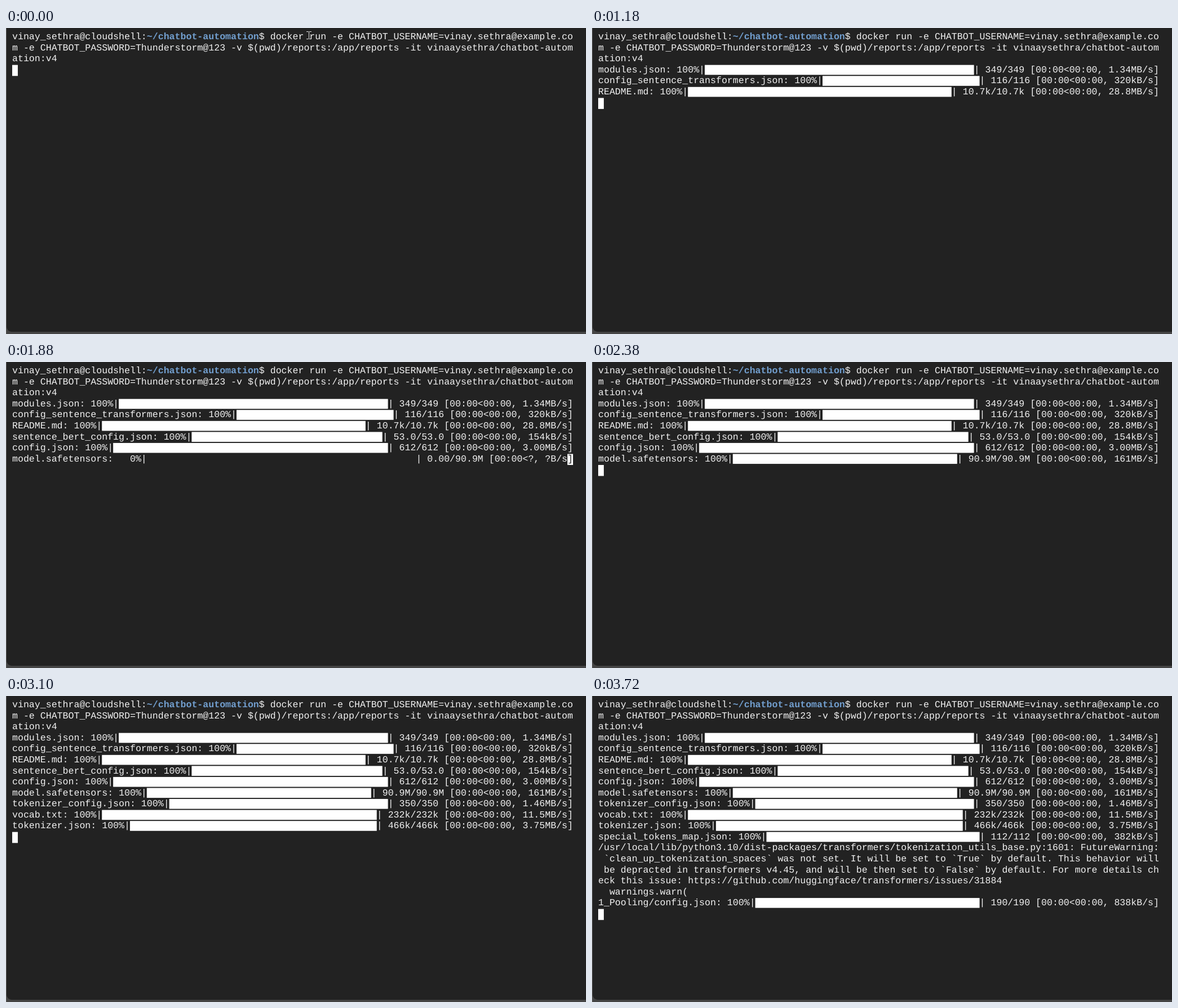
These frames come from a looping animation (1029 by 544 pixels, 8 s). An HTML page with a canvas:

```html
<!DOCTYPE html>
<html lang="en">
<head>
<meta charset="utf-8">
<title>Terminal</title>
<style>
  html, body { margin: 0; width: 100%; height: 100%; overflow: hidden; background: #222; }
  canvas { display: block; }
</style>
</head>
<body>
<canvas id="stage" width="1029" height="544"></canvas>
<script>
const ctx = document.getElementById('stage').getContext('2d');
const LOOP = 8000, COLS = 100;
const X0 = 11, Y0 = 7, CELL = 9.95, ROW = 19.56, BASE = 13.2, BAR = 17.6;
const FONT = '16.58px "Liberation Mono", "Courier New", monospace';
const BG = '#222222', FG = '#ffffff', INK = '#f2f2f2', BLUE = '#729fcf';

const USER = 'vinay_sethra@cloudshell:';
const PATH = '~/chatbot-automation';
const COMMAND = [
  USER + PATH + '$ docker run -e CHATBOT_USERNAME=vinay.sethra@example.co',
  'm -e CHATBOT_PASSWORD=Thunderstorm@123 -v $(pwd)/reports:/app/reports -it vinaaysethra/chatbot-autom',
  'ation:v4'
];
const WARNING = [
  '/usr/local/lib/python3.10/dist-packages/transformers/tokenization_utils_base.py:1601: FutureWarning:',
  ' `clean_up_tokenization_spaces` was not set. It will be set to `True` by default. This behavior will',
  ' be depracted in transformers v4.45, and will be then set to `False` by default. For more details ch',
  'eck this issue: https://github.com/huggingface/transformers/issues/31884',
  '  warnings.warn('
];

// A progress line; the bar fills whatever the text leaves of the row.
function progress(name, done, total, rate, part = 1, left = '00:00') {
  const pct = String(Math.floor(part * 100)).padStart(3);
  return {
    head: `${name}: ${pct}%|`,
    tail: `| ${done}/${total} [00:00<${left}, ${rate}B/s]`,
    part
  };
}
const full = (name, size, rate) => progress(name, size, size, rate);
const model = (done, rate, part, left) =>
  progress('model.safetensors', done, '90.9M', rate, part, left);

// Each event prints lines, rewrites the open line, or moves the pointer.
const events = [
  { at: 0, print: COMMAND, mouse: [537, 13] },
  { at: 500, mouse: [541, 8] },
  { at: 650, mouse: [640, 120] },
  { at: 770, print: [full('modules.json', '349', '1.34M')], mouse: [730, 231] },
  { at: 900, mouse: [745, 300] },
  { at: 1030, print: [full('config_sentence_transformers.json', '116', '320k')], mouse: null },
  { at: 1180, print: [full('README.md', '10.7k', '28.8M')] },
  { at: 1460, print: [full('sentence_bert_config.json', '53.0', '154k')] },
  { at: 1590, print: [full('config.json', '612', '3.00M')] },
  { at: 1880, open: model('0.00', '?', 0, '?') },
  { at: 2010, open: model('21.0M', '152M', 0.231) },
  { at: 2130, open: model('41.9M', '158M', 0.461) },
  { at: 2260, open: model('73.4M', '160M', 0.807) },
  { at: 2380, print: [full('model.safetensors', '90.9M', '161M')] },
  { at: 2660, print: [full('tokenizer_config.json', '350', '1.46M')] },
  { at: 2820, print: [full('vocab.txt', '232k', '11.5M')] },
  { at: 3100, print: [full('tokenizer.json', '466k', '3.75M')] },
  { at: 3350, print: [full('special_tokens_map.json', '112', '382k')] },
  { at: 3470, print: WARNING },
  { at: 3720, print: [full('1_Pooling/config.json', '190', '838k')] }
];

const colX = col => X0 + col * CELL;
const rowY = row => Y0 + row * ROW;

function write(text, col, row, color = INK, weight = '') {
  ctx.font = `${weight} ${FONT}`;
  ctx.fillStyle = color;
  [...text].forEach((ch, i) => {
    if (ch !== ' ') ctx.fillText(ch, colX(col + i), rowY(row) + BASE);
  });
}

function block(col, row, cells, height) {
  ctx.fillStyle = FG;
  ctx.fillRect(colX(col), rowY(row), cells * CELL, height);
}

function writeLine(line, row) {
  if (typeof line === 'string') return write(line, 0, row);
  const { head, tail, part } = line;
  const room = COLS - head.length - tail.length;
  write(head, 0, row);
  block(head.length, row, Math.floor(room * part * 8) / 8, BAR);
  write(tail, head.length + room, row);
}

function drawPrompt() {
  write(USER, 0, 0);
  write(PATH, USER.length, 0, BLUE, 'bold');
  const col = USER.length + PATH.length;
  write(COMMAND[0].slice(col), col, 0);
}

function drawMouse([x, y]) {
  ctx.fillStyle = '#e4e4e4';
  ctx.fillRect(x, y - 6, 1, 12);
  for (const edge of [y - 7, y + 6]) {
    ctx.fillRect(x - 4, edge, 4, 1);
    ctx.fillRect(x + 1, edge, 4, 1);
  }
}

function drawWindow() {
  ctx.fillStyle = '#444444';
  ctx.fillRect(0, 0, 1029, 544);
  ctx.fillStyle = '#5c5c5c';
  ctx.fillRect(0, 0, 1, 544);
  ctx.fillStyle = BG;
  ctx.beginPath();
  ctx.roundRect(1, -20, 1060, 560, 9);
  ctx.fill();
}

function draw(count) {
  const lines = [];
  let open = null, mouse = null;
  for (const e of events.slice(0, count)) {
    open = e.open || null;
    if (e.print) lines.push(...e.print);
    if (e.mouse !== undefined) mouse = e.mouse;
  }
  drawWindow();
  drawPrompt();
  lines.forEach((line, row) => row && writeLine(line, row));
  const row = lines.length;
  if (open) {
    writeLine(open, row);
    block(COLS - 1, row, 1, ROW);
    write(']', COLS - 1, row, BG);
  } else {
    block(0, row, 1, ROW);
  }
  if (mouse) drawMouse(mouse);
}

ctx.textRendering = 'geometricPrecision';
const start = performance.now();
let shown = 0;

function tick() {
  const t = (performance.now() - start) % LOOP;
  const count = events.filter(e => e.at <= t).length;
  if (count !== shown) draw(shown = count);
  requestAnimationFrame(tick);
}
tick();
</script>
</body>
</html>
```
